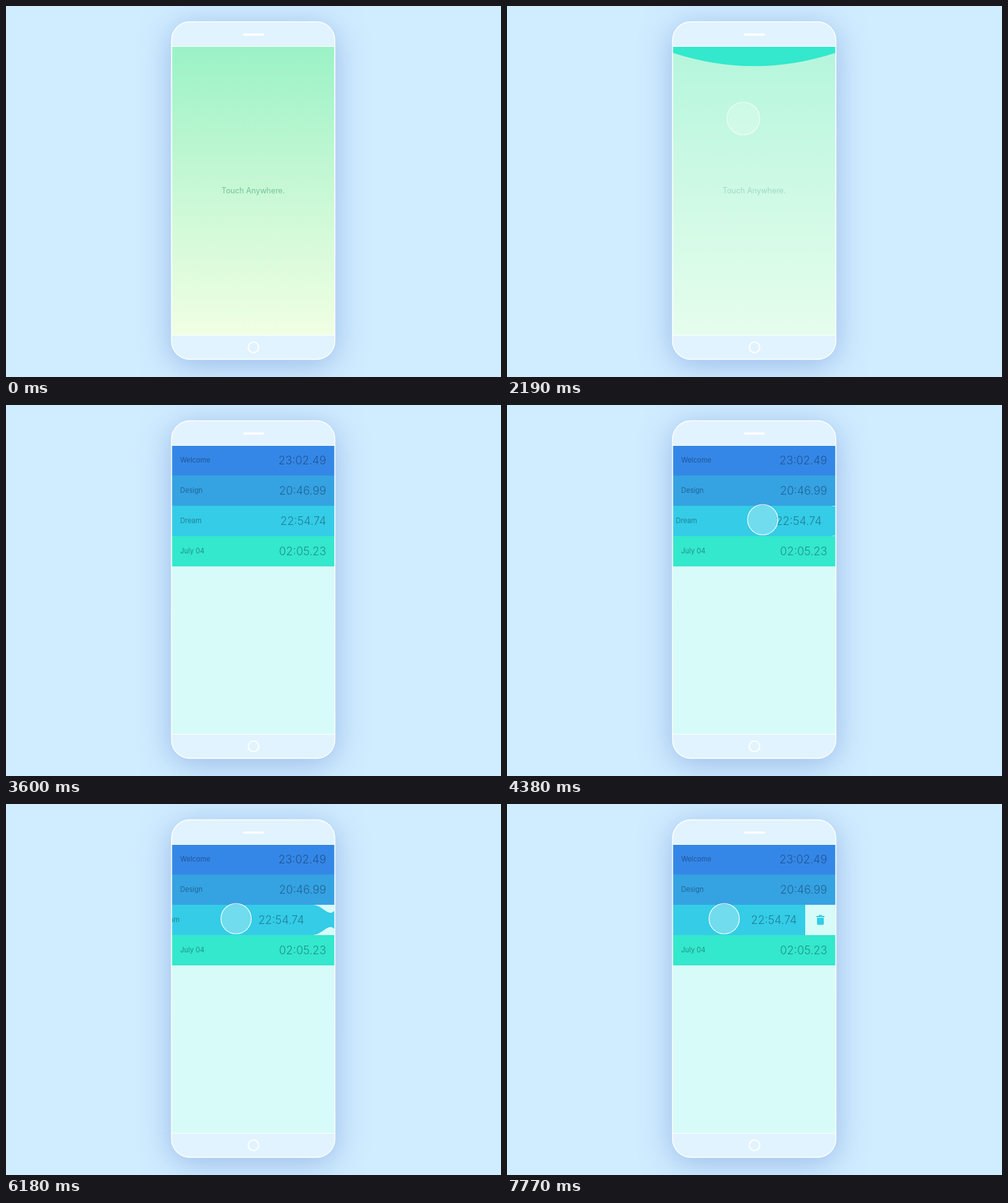
An HTML page with a canvas that plays this animation: 800 by 600 pixels, repeating every 8 s.

```html
<!DOCTYPE html>
<html lang="en">
<head>
<meta charset="utf-8">
<title>Pull and swipe list</title>
<style>
  html, body { margin: 0; height: 100%; overflow: hidden; background: #d0ecff; }
  canvas { display: block; }
</style>
</head>
<body>
<canvas width="800" height="600"></canvas>
<script>
const ctx = document.querySelector('canvas').getContext('2d');
const LOOP = 8000;
const LEFT = 268, RIGHT = 531, TOP = 66, BOTTOM = 532, ROW = 49, OPEN = 49;
const TEAL = [51, 232, 204];
const rows = [
  ['Welcome', '23:02.49', [52, 135, 230]],
  ['Design', '20:46.99', [53, 162, 226]],
  ['Dream', '22:54.74', [52, 204, 230]],
  ['July 04', '02:05.23', TEAL]
];

// Timeline in ms
const PULL = 750, DROP = 2105, SWIPE_1 = 4155, RELEASE = 4950, SWIPE_2 = 5655;
const SWIPE_TIME = 810, RELEASE_TIME = 330, SNAP = SWIPE_2 + SWIPE_TIME + 60;

const span = (t, start, length) => Math.min(1, Math.max(0, (t - start) / length));
const sine = u => (1 - Math.cos(Math.PI * u)) / 2;
const cubic = u => u < .5 ? 4 * u ** 3 : 1 - 4 * (1 - u) ** 3;
const mix = (a, b, u) => a + (b - a) * u;
const mixColor = (a, b, u) => `rgb(${a.map((v, i) => Math.round(mix(v, b[i], u)))})`;

function text(string, x, y, size, weight, color, align) {
  ctx.font = `${weight} ${size}px Inter, sans-serif`;
  ctx.fillStyle = color;
  ctx.textAlign = align;
  ctx.textBaseline = 'alphabetic';
  ctx.fillText(string, x, y + size * .36);
}

function drawPhone() {
  ctx.fillStyle = '#d0ecff';
  ctx.fillRect(0, 0, 800, 600);
  ctx.save();
  ctx.beginPath();
  ctx.roundRect(267.5, 25.5, 264, 546, 30);
  ctx.shadowColor = 'rgba(100, 140, 210, .52)';
  ctx.shadowBlur = 50;
  ctx.shadowOffsetY = 8;
  ctx.fillStyle = '#e1f3ff';
  ctx.fill();
  ctx.restore();
  ctx.strokeStyle = '#fff';
  ctx.lineWidth = 1.5;
  ctx.stroke();
  ctx.fillStyle = '#fff';
  ctx.fillRect(LEFT, TOP - 1, RIGHT - LEFT, BOTTOM - TOP + 2);
  ctx.beginPath();
  ctx.roundRect(383, 44.5, 34, 3.5, 1.75);
  ctx.fill();
  ctx.beginPath();
  ctx.arc(400, 552, 8.5, 0, 7);
  ctx.lineWidth = 2;
  ctx.stroke();
}

function drawWelcome(fade) {
  const gradient = ctx.createLinearGradient(0, TOP, 0, BOTTOM);
  gradient.addColorStop(0, '#9bf2c6');
  gradient.addColorStop(.5, '#c8f8d5');
  gradient.addColorStop(1, '#f0ffe3');
  ctx.fillStyle = gradient;
  ctx.fillRect(LEFT, TOP, RIGHT - LEFT, BOTTOM - TOP);
  text('Touch Anywhere.', 399.5, 299, 12.4, 400, 'rgba(45, 150, 110, .55)', 'center');
  ctx.globalAlpha = fade;
  ctx.fillStyle = '#d7fbf9';
  ctx.fillRect(LEFT, TOP, RIGHT - LEFT, BOTTOM - TOP);
  ctx.globalAlpha = 1;
}

// Right end of the swiped row: a stretching neck, then two retracting tips.
function swipedRow(y, offset, snap) {
  const mid = y + ROW / 2, end = y + ROW, edge = RIGHT - offset;
  const at = k => RIGHT - k * offset;
  ctx.beginPath();
  ctx.moveTo(LEFT, y);
  ctx.lineTo(edge, y);
  if (snap > 0) {
    const tip = 40 * (1 - snap), wall = 9 * (1 - snap), half = 18 * (1 - snap);
    ctx.bezierCurveTo(edge + .35 * tip, y, edge + .6 * tip, mid, edge + tip, mid);
    ctx.bezierCurveTo(edge + .6 * tip, mid, edge + .35 * tip, end, edge, end);
    ctx.lineTo(LEFT, end);
    ctx.moveTo(RIGHT, mid - half);
    ctx.quadraticCurveTo(RIGHT - 2 * wall, mid, RIGHT, mid + half);
  } else {
    const depth = ROW / 2 * (offset / OPEN) ** 2;
    ctx.bezierCurveTo(at(.65), y, at(.4), y + depth, at(.19), y + depth);
    ctx.quadraticCurveTo(at(.08), y + depth, RIGHT, y + .73 * depth);
    ctx.lineTo(RIGHT, end - .73 * depth);
    ctx.quadraticCurveTo(at(.08), end - depth, at(.19), end - depth);
    ctx.bezierCurveTo(at(.4), end - depth, at(.65), end, edge, end);
    ctx.lineTo(LEFT, end);
  }
  ctx.fill();
}

function drawTrash(scale) {
  ctx.save();
  ctx.translate(506.5, 187.5);
  ctx.scale(scale, scale);
  ctx.fillStyle = '#34cce6';
  ctx.beginPath();
  ctx.roundRect(-6.5, -6.5, 13, 2, .5);
  ctx.rect(-2.5, -8, 5, 2);
  ctx.roundRect(-5.5, -3.5, 11, 11.5, [0, 0, 2, 2]);
  ctx.fill();
  ctx.restore();
}

// Bulge of the lower edge: pulled by the finger, then a damped swing.
function bulgeAt(t) {
  if (t < DROP) return 22 * sine(span(t, PULL, DROP - PULL));
  if (t < 2475) return mix(22, 18, sine(span(t, DROP, 370)));
  if (t < 2635) return mix(18, -10, sine(span(t, 2475, 160)));
  return mix(-10, 0, sine(span(t, 2635, 155)));
}

function drawList(t) {
  const full = ROW * rows.length - 1;
  const height = full * cubic(span(t, DROP, 370));
  const bulge = bulgeAt(t), shift = height - full + .75 * bulge;
  const reveal = sine(span(t, 2280, 440));
  const snap = sine(span(t, SNAP, 270));
  const offset = t < SWIPE_2
    ? OPEN * sine(span(t, SWIPE_1, SWIPE_TIME)) * (1 - sine(span(t, RELEASE, RELEASE_TIME)))
    : OPEN * sine(span(t, SWIPE_2, SWIPE_TIME));

  if (snap > 0) drawTrash(snap);
  ctx.save();
  ctx.beginPath();
  ctx.moveTo(LEFT, TOP);
  ctx.lineTo(LEFT, TOP + height);
  ctx.quadraticCurveTo(399.5, TOP + height + 2 * bulge, RIGHT, TOP + height);
  ctx.lineTo(RIGHT, TOP);
  ctx.clip();
  rows.forEach(([label, time, color], i) => {
    const y = TOP - 1 + ROW * i + shift, x = i === 2 ? -offset : 0;
    ctx.fillStyle = mixColor(TEAL, color, reveal);
    if (i === 2 && offset > 0) {
      swipedRow(y, offset, snap);
    } else {
      const from = i ? y : 0, to = i === 3 ? 600 : y + ROW;
      ctx.fillRect(LEFT, from, RIGHT - LEFT, to - from);
    }
    const ink = `rgba(0, 0, 30, ${.38 * reveal})`;
    text(label, 281.5 + x, y + 24.5, 11.1, 400, ink, 'left');
    text(time, 517.5 + x, y + 24.5, 18.2, 300, ink, 'right');
  });
  ctx.restore();
}

function drawTouch(t, start, release, [x0, y0], [x1, y1], moveTime) {
  const gone = span(t, release, RELEASE_TIME);
  if (t < start || gone === 1) return;
  const shown = span(t, start, 180), move = sine(span(t, start, moveTime));
  const radius = 25 * mix(.5, 1, sine(shown)) * (1 + .5 * sine(gone));
  ctx.globalAlpha = shown * (1 - gone);
  ctx.beginPath();
  ctx.arc(mix(x0, x1, move), mix(y0, y1, move), radius - .5, 0, 7);
  ctx.fillStyle = 'rgba(255, 255, 255, .3)';
  ctx.fill();
  ctx.strokeStyle = '#fff';
  ctx.lineWidth = 1.2;
  ctx.stroke();
  ctx.globalAlpha = 1;
}

function draw(now) {
  const t = now % LOOP;
  drawPhone();
  ctx.save();
  ctx.beginPath();
  ctx.rect(LEFT + .5, TOP, RIGHT - LEFT - 1, BOTTOM - TOP);
  ctx.clip();
  drawWelcome(span(t, DROP, 205));
  drawList(t);
  drawTouch(t, PULL - 30, DROP, [382, 118], [382, 182], DROP - PULL);
  drawTouch(t, SWIPE_1, RELEASE, [427, 185.5], [351, 185.5], SWIPE_TIME);
  drawTouch(t, SWIPE_2, LOOP, [427, 185.5], [351, 185.5], SWIPE_TIME);
  ctx.restore();
  requestAnimationFrame(draw);
}
requestAnimationFrame(draw);
</script>
</body>
</html>
```
